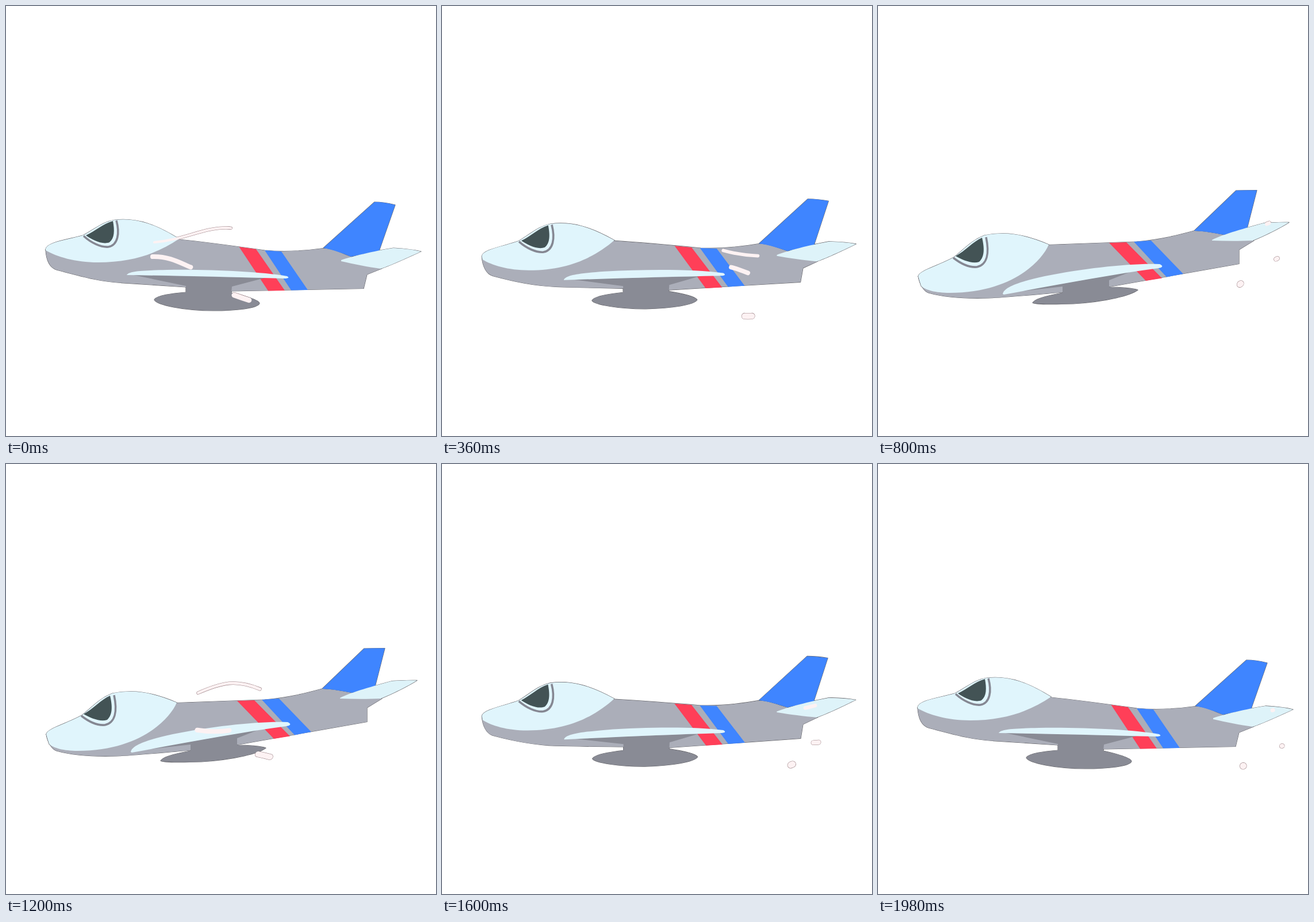
Write an HTML page that moves like this. It is 748 px wide and 748 px high and loops after 2000 ms.

```html
<!DOCTYPE html>
<html lang="en">
<head>
<meta charset="utf-8">
<title>Jet</title>
<style>
  html, body { margin: 0; width: 100%; height: 100%; overflow: hidden; background: #fff; }
  svg { display: block; width: 100vw; height: 100vh; }
  path { fill: none; }
  #edge path { stroke: #3a3a40; stroke-opacity: .8; stroke-width: 1.2; stroke-linejoin: round; }
  #edge .streak, .streak { stroke-linecap: round; }
  #edge .streak { stroke: #7d5c62; }
</style>
</head>
<body>
<svg viewBox="0 0 748 748">
  <g id="edge"></g>
  <g id="jet"></g>
  <g id="wind"></g>
</svg>
<script>
const LOOP = 2000, STEP = 20;
const GREY = '#abaeb9', SHADE = '#898b95', PALE = '#e0f5fc', BLUE = '#3f85ff', RED = '#ff3f58';

// Each part has a nose-up and a nose-down outline with matching points.
const parts = [
  { fill: GREY, edge: true,
    up: 'M69,424 C70,442 76,455 88,459 C130,470 160,479 200,481.5 C240,484 280,487 313,489 L392,496 L622,491.5 L628,467 L653,457 L600,436 C585,431 570,422 552,421.5 C520,426 480,428 450,425 C400,418 350,411 301,406 L200,400 Z',
    down: 'M70,470 C72,484 80,496 88,499 C120,508 160,509 193,508 C235,506 280,501 322,498 L402,488.5 L628,448.5 L628,424 L654,408 L602,398 C585,395 570,392 550,391 C520,399 490,407 450,410 C400,411.5 350,414 297,415.5 L200,410 Z' },
  { fill: RED,
    up: 'M405.5,419 L435,423 L485,495 L456,495.5 Z',
    down: 'M402,412 L432,411 L494,473.5 L466,478 Z' },
  { fill: BLUE,
    up: 'M450,425 L479,427 L525,494 L496,494.5 Z',
    down: 'M445,410 L475,408 L531,466 L502,471.5 Z' },
  { fill: BLUE, edge: true,
    up: 'M552,421 L641,341 C655,341 665,343 677,346 L649,426 L600,436 C585,430 570,424 552,421 Z',
    down: 'M550,391 L623,321 C635,320.5 647,320.5 659,320.5 L642,387 L602,398 C585,395 570,392 550,391 Z' },
  { fill: '#def3f9', edge: true,
    up: 'M583,442 C600,436 640,426 674,421 C690,422 705,423 722,427 C700,437 670,451 652,457 C630,454 605,449 583,444 Z',
    down: 'M581,407 C600,397 640,386 672,377.5 C685,377 700,376 715,376.5 C700,386 670,401 652,408 C630,409 605,409 581,408 Z' },
  { fill: SHADE, edge: true,
    up: 'M258,511 C262,503 290,500 313,498 L313,487 L222,468 L450,473 L393,488 L392,499 C410,503 438,510 441,517 C438,526 400,530 360,530 C310,530 262,520 258,511 Z',
    down: 'M269,516 C275,508 300,503 321,499 L321,488 L240,497 L440,462 L402,477 L402,489 C420,489 445,491 452,494 C440,503 400,514 340,518 C310,519 272,519 269,516 Z' },
  { fill: PALE,
    up: 'M210,468 C214,461 235,460 280,459 C360,458 440,462 489,470 C494,473 490,474 484,474 C400,472 300,469 210,468 Z',
    down: 'M217,501 C219,489 245,480 290,470 C360,456 440,447 490,449 C497,452 495,455 488,456 C400,468 300,487 219,502 Z' },
  { fill: PALE, edge: true,
    up: 'M69,423 C71,411 105,407 134,399 C155,388 168,375 190,372 C230,368 262,381 301,405 C262,431 220,446 160,446 C120,446 88,436 69,425 Z',
    down: 'M70,470 C72,460 105,452 132,437 C150,423 162,408 185,399 C220,392 252,396 297,415 C284,446 230,499 125,499 C100,499 82,494 75,487 Z' },
  { fill: '#435355',
    up: 'M139,399 C155,392 168,379 186,374 C189,390 189,404 180,411 C168,416 150,407 139,399 Z',
    down: 'M135,435 C152,426 165,410 181,403 C185,420 186,436 176,445 C164,449 147,442 135,435 Z' },
  { line: '#858792',
    up: 'M135,400 C148,412 165,420 178,419 C195,416 198,395 192,373',
    down: 'M131,438 C145,449 160,455 172,454 C190,450 194,430 188,402' }
];

// span: share of the track covered at the start; thin/thick: line width over time
const streaks = [
  { span: .305, thin: 4.2, thick: 7,
    track: 'M258,411 C310,407 345,384 388,386 C430,389 455,418 490,431 C540,447 590,446 637,438 L688,428' },
  { span: .15, thin: 8, thick: 7.5,
    track: 'M255,436 C285,435 305,448 323,455 C345,463 370,469 395,468 C440,464 475,453 505,461 C540,472 580,501 650,500 Q680,500 704,490' },
  { span: .11, thin: 9, thick: 11,
    track: 'M397,503 C420,511 440,517 472,531 C495,541 515,547 538,547 C570,547 595,541 612,535 L636,525' }
];

const $ = id => document.getElementById(id);

function addPath(parent, attrs) {
  const el = document.createElementNS('http://www.w3.org/2000/svg', 'path');
  for (const key in attrs) el.setAttribute(key, attrs[key]);
  return parent.appendChild(el);
}

// Easing curve with handles (x1, 0) and (x2, 1).
function ease(x, x1, x2) {
  let lo = 0, hi = 1;
  for (let i = 0; i < 30; i++) {
    const s = (lo + hi) / 2, r = 1 - s;
    if (3 * r * r * s * x1 + 3 * r * s * s * x2 + s * s * s < x) lo = s;
    else hi = s;
  }
  return lo * lo * (3 - 2 * lo);
}

const numbers = d => d.match(/[\d.]+/g).map(Number);

function morph({ up, from, to }, k) {
  let i = 0;
  return up.replace(/[\d.]+/g, () => {
    const value = from[i] + (to[i] - from[i]) * k;
    i++;
    return value.toFixed(2);
  });
}

for (const part of parts) {
  part.from = numbers(part.up);
  part.to = numbers(part.down);
  const look = part.fill ? { style: `fill:${part.fill}` } : { stroke: part.line, 'stroke-width': 3.6 };
  part.els = [addPath($('jet'), look)];
  if (part.edge) part.els.push(addPath($('edge'), {}));
}

for (const streak of streaks) {
  const attrs = { d: streak.track, pathLength: 1, class: 'streak' };
  streak.under = addPath($('edge'), attrs);
  streak.over = addPath($('wind'), { ...attrs, stroke: '#fdf2f3' });
}

function draw(t) {
  const swing = 1 - Math.abs(1 - t / 1000);
  const tilt = ease(swing, .5, .5) / .935;
  for (const part of parts) {
    const d = morph(part, tilt);
    part.els.forEach(el => el.setAttribute('d', d));
  }

  const start = ease(t % 1000 / 1000, .337, .23);
  const skew = -.162 * tilt;
  for (const { span, thin, thick, under, over } of streaks) {
    const length = Math.max(span * (1 - start), .002);
    const width = thin + (thick - thin) * start;
    [under, over].forEach((el, i) => {
      el.setAttribute('transform', `matrix(1 ${skew} 0 1 0 ${-360 * skew})`);
      el.style.strokeDasharray = `${length} 3`;
      el.style.strokeDashoffset = -Math.min(start, .996);
      el.style.strokeWidth = width + (i ? 0 : 1.1);
    });
  }
}

const begin = performance.now();
function tick() {
  const t = Math.max(0, performance.now() - begin) % LOOP;
  draw(Math.floor(t / STEP) * STEP);
  requestAnimationFrame(tick);
}
tick();
</script>
</body>
</html>
```
